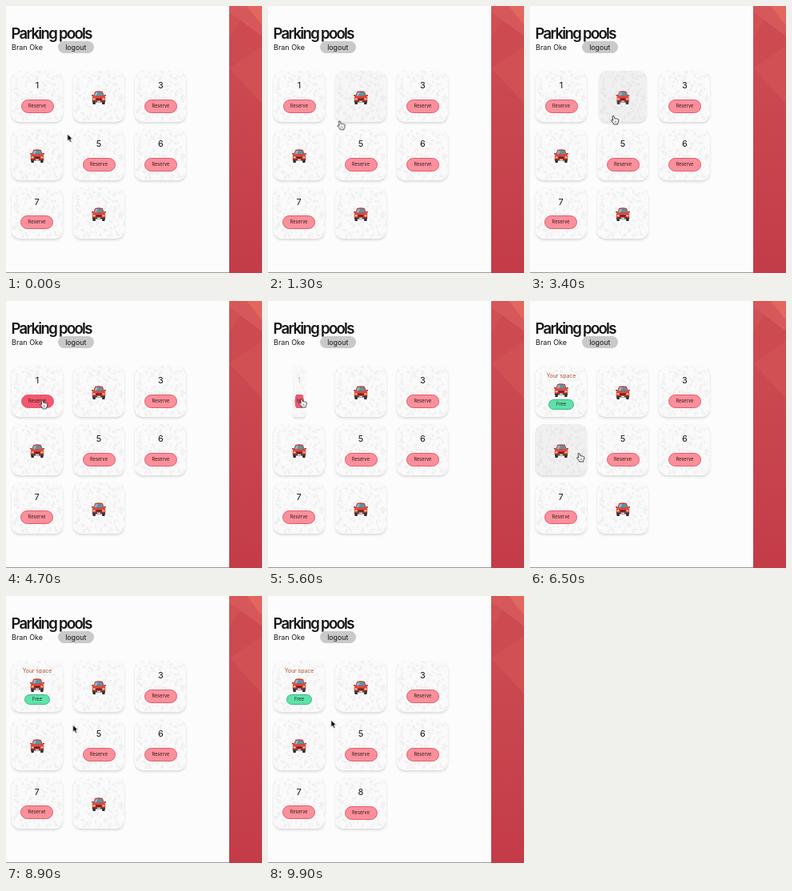
These frames come from a looping animation (320 px wide and 334 px high, 10000 ms). An HTML page:

```html
<!DOCTYPE html>
<html lang="en">
<head>
<meta charset="utf-8">
<title>Parking pools</title>
<style>
html, body { margin: 0; width: 100%; height: 100%; overflow: hidden; }
body { position: relative; background: #fcfcfc; color: #161616; font-family: Inter, sans-serif; }
h1, .user, .logout, .tile, .side, .edge, .cursor { position: absolute; margin: 0; white-space: nowrap; }
h1 { left: 6.5px; top: 23px; font-size: 18.5px; line-height: 22px; font-weight: 600; letter-spacing: -1.68px; }
.user { left: 7px; top: 45px; font-size: 9px; line-height: 13px; }
.logout { left: 65px; top: 43.5px; width: 44.5px; height: 15px; border-radius: 8px; background: #c9c9c9;
  font-size: 8.8px; line-height: 15px; text-align: center; }
.side { left: 279px; top: 0; }
.edge { left: 0; top: 333px; width: 279px; height: 1px; background: #9a9a9a; }

.tile, .card, .face { width: 64px; height: 64px; }
.card { position: relative; transform-style: preserve-3d; }
.card, .shade, .cursor, .cursor svg { animation: 10s infinite; }
.face { position: absolute; inset: 0; border-radius: 10px; background: #fafafa; overflow: hidden;
  box-shadow: 0 2px 3px rgba(0, 0, 0, .13); backface-visibility: hidden; }
.back { transform: rotateY(180deg); }
.face > * { position: absolute; left: 0; right: 0; text-align: center; }
.face .shade { inset: 0; background: rgba(0, 0, 0, .04); opacity: 0; }
.num { top: 11px; font-size: 11px; line-height: 14px; }
.btn { box-sizing: border-box; margin: auto; border: 1px solid; font-size: 5.5px; letter-spacing: .12px; color: #2c1619; }
.reserve { top: 35.5px; width: 41px; height: 17px; line-height: 15px; border-radius: 9px;
  background: #fa909b; border-color: #e5596c; }
.free { top: 42px; width: 31.5px; height: 12.5px; line-height: 10.5px; border-radius: 7px;
  background: #5fe2aa; border-color: #3cb487; color: #10291f; }
.mine { top: 8px; font-size: 6.9px; line-height: 9px; color: #a9552f; }
.name { top: 26.5px; font-size: 7.6px; line-height: 11px; font-weight: 700; }
.car { top: 24.5px; margin: auto; width: 18px; height: 17px; }
.mine ~ .car { top: 22px; }

.t1 .card { animation-name: flip1; }
.t2 .card { animation-name: flip2; }
.t4 .card { animation-name: flip4; }
.t8 .card { animation-name: flip8; }
.t2 .shade { animation-name: shade2; }
.t4 .shade { animation-name: shade4; }
.t1 .reserve { animation: press 10s infinite; }
@keyframes flip1 { 0%, 54% { transform: rotateY(0) } 62%, 100% { transform: rotateY(180deg) } }
@keyframes flip2 { 0%, 15.5% { transform: rotateY(0) } 23.5%, 29.3% { transform: rotateY(180deg) } 37.3%, 100% { transform: rotateY(0) } }
@keyframes flip4 { 0%, 66.5% { transform: rotateY(0) } 74.5%, 80.5% { transform: rotateY(180deg) } 88.5%, 100% { transform: rotateY(0) } }
@keyframes flip8 { 0%, 93% { transform: rotateY(0) } 100% { transform: rotateY(180deg) } }
@keyframes shade2 { 0%, 12.5% { opacity: 0 } 14.5%, 37.5% { opacity: 1 } 39.5%, 100% { opacity: 0 } }
@keyframes shade4 { 0%, 63% { opacity: 0 } 64.5%, 85.5% { opacity: 1 } 87.5%, 100% { opacity: 0 } }
@keyframes press { 0%, 44% { background: #fa909b } 46%, 100% { background: #f4576f } }

.cursor { left: 0; top: 0; animation-name: move; animation-timing-function: ease-in-out; }
.cursor svg { position: absolute; left: 0; top: 0; overflow: visible; animation-timing-function: step-end; }
.cursor .arrow { animation-name: arrow; }
.cursor .hand { animation-name: hand; }
@keyframes move {
  0% { transform: translate(76.5px, 160px) }
  5%, 10% { transform: translate(77px, 157px) }
  15%, 20% { transform: translate(95.5px, 137px) }
  23% { transform: translate(103.5px, 137.5px) }
  28%, 36% { transform: translate(104px, 137px) }
  45% { transform: translate(46px, 124px) }
  51%, 61.9% { transform: translate(41.5px, 122px) }
  65% { transform: translate(61px, 190px) }
  75%, 83% { transform: translate(59.5px, 166px) }
  88% { transform: translate(84px, 162px) }
  92%, 100% { transform: translate(78.5px, 155px) }
}
@keyframes arrow {
  0% { opacity: 1 } 12.5% { opacity: 0 } 38% { opacity: 1 } 43.5% { opacity: 0 }
  62.6% { opacity: 1 } 63.2% { opacity: 0 } 86%, 100% { opacity: 1 }
}
@keyframes hand {
  0% { opacity: 0 } 12.5% { opacity: 1 } 38% { opacity: 0 } 43.5% { opacity: 1 }
  62.6% { opacity: 0 } 63.2% { opacity: 1 } 86%, 100% { opacity: 0 }
}
</style>
</head>
<body>
<h1>Parking pools</h1>
<div class="user">Bran Oke</div>
<div class="logout">logout</div>

<svg class="side" width="41" height="334" viewBox="0 0 41 334">
  <defs>
    <linearGradient id="red" x2="0" y2="1">
      <stop offset="0" stop-color="#d0505a"/><stop offset=".35" stop-color="#cb4850"/><stop offset="1" stop-color="#c43c48"/>
    </linearGradient>
    <pattern id="dots" width="4" height="4" patternUnits="userSpaceOnUse">
      <path d="M0 0h1v1H0zM2 2h1v1H2z" fill="#a82f3d" opacity=".14"/>
    </pattern>
  </defs>
  <path fill="url(#red)" d="M0 0h41v334H0z"/>
  <path fill="#d7585a" d="M0 0h41v38L0 8z"/>
  <path fill="#e2675f" d="M22 0h19v24z"/>
  <path fill="#d05053" d="M0 8l41 30v84L0 78z"/>
  <path fill="#cc4a50" d="M0 40l14-22 27 20v12L0 78z"/>
  <path fill="url(#dots)" d="M0 78l41 44v212H0z"/>
</svg>
<div class="edge"></div>

<svg width="0" height="0" style="position:absolute">
  <symbol id="car" viewBox="0 0 18 17">
    <path fill="#25272b" d="M1.200 13h3.600v4H1.600zM13.200 13h3.600l-.4 4h-3.200z"/>
    <path fill="#d8322a" d="M4.200 1Q9-.3 13.800 1l2.100 5.500 1.300 1.800V14H.8V8.300l1.300-1.800z"/>
    <path fill="#c2261f" d="M0 5h2.300v1.800H.3zM18 5h-2.300v1.800h2z"/>
    <path fill="#5b93a3" d="M4.700 1.900q4.300-.8 8.600 0l1.500 4.500H3.200z"/>
    <path fill="#8fc0cb" d="M5 2.200l3-.3-2 4.300H3.800z"/>
    <path fill="#f04a3e" d="M2.200 7.300h13.600l1 1.500H1.200z"/>
    <path fill="#4a2224" d="M5.500 9.800h7v1.700h-7z"/>
    <path fill="#3a3d42" d="M1 12.800h16v1.700H1z"/>
    <path fill="#f6dfa2" d="M1.600 9.600h3v1.700h-3zM13.400 9.600h3v1.700h-3z"/>
    <path fill="#e4e4e4" d="M7 12.800h4v1.300H7z"/>
  </symbol>
  <symbol id="flakes" viewBox="0 0 64 64"></symbol>
</svg>
<main></main>

<div class="cursor">
  <svg class="arrow" width="8" height="12"><path d="M.3 0v9l2-1.800 1.500 3.200 1.600-.7L4 6.600h2.700z" fill="#000" stroke="#fff" stroke-width=".7"/></svg>
  <svg class="hand" width="12" height="12"><path d="M-1 1Q0-.3 1 1l1 3q1.200-.8 1.800.1 1.200-.6 1.700.4 1.300-.3 1.300 1.300 0 2.700-1.200 3.900V11H.8Q.2 9-2.500 6.500q0-1.300 1.300-.9l1 .7z" fill="#fff" stroke="#111" stroke-width=".8" stroke-linejoin="round"/><path d="M2 6.500v2.500M3.500 6.500v2.500" stroke="#333" stroke-width=".5"/></svg>
</div>

<script>
// Seeded flakes for the tile texture
let seed = 7;
const rnd = () => (seed = seed * 16807 % 2147483647) / 2147483647;
const rows = 10, step = 64 / rows;
let d = "";
for (let i = 0; i < rows * rows; i++) {
  const x = (i % rows + rnd()) * step, y = (Math.floor(i / rows) + rnd()) * step;
  const a = rnd() * 6.283, len = 3 + rnd() * 4, w = 1.5 + rnd() * 2;
  const c = Math.cos(a), s = Math.sin(a);
  const pts = [[x, y], [x + c * len, y + s * len], [x + c * len * .4 - s * w, y + s * len * .4 + c * w]];
  d += "M" + pts.map(p => p.map(n => n.toFixed(1)).join(" ")).join("L") + "z";
}
document.getElementById("flakes").innerHTML =
  `<path d="${d}" fill="#f0f0f0" stroke="#f0f0f0" stroke-width=".6" stroke-linejoin="round"/>`;

const car = '<svg class="car"><use href="#car"/></svg>';
const spot = n => `<div class="num">${n}</div><div class="btn reserve">Reserve</div>`;
const owner = name => `<div class="name">${name}</div>`;
const mine = `<div class="mine">Your space</div>${car}<div class="btn free">Free</div>`;
const face = (side, body) => `<div class="face ${side}">
  <svg width="64" height="64"><use href="#flakes"/></svg><div class="shade"></div>${body}</div>`;

const tiles = [
  [spot(1), mine], [car, owner("Maeva O'Tull")], [spot(3)],
  [car, owner("Dorin Vask")], [spot(5)], [spot(6)],
  [spot(7)], [car, spot(8)]
];
document.querySelector("main").innerHTML = tiles.map(([front, back], i) =>
  `<div class="tile t${i + 1}" style="left:${6.6 + i % 3 * 77.4}px;top:${81.2 + Math.floor(i / 3) * 72.8}px">
    <div class="card">${face("front", front)}${back ? face("back", back) : ""}</div></div>`).join("");
</script>
</body>
</html>
```
